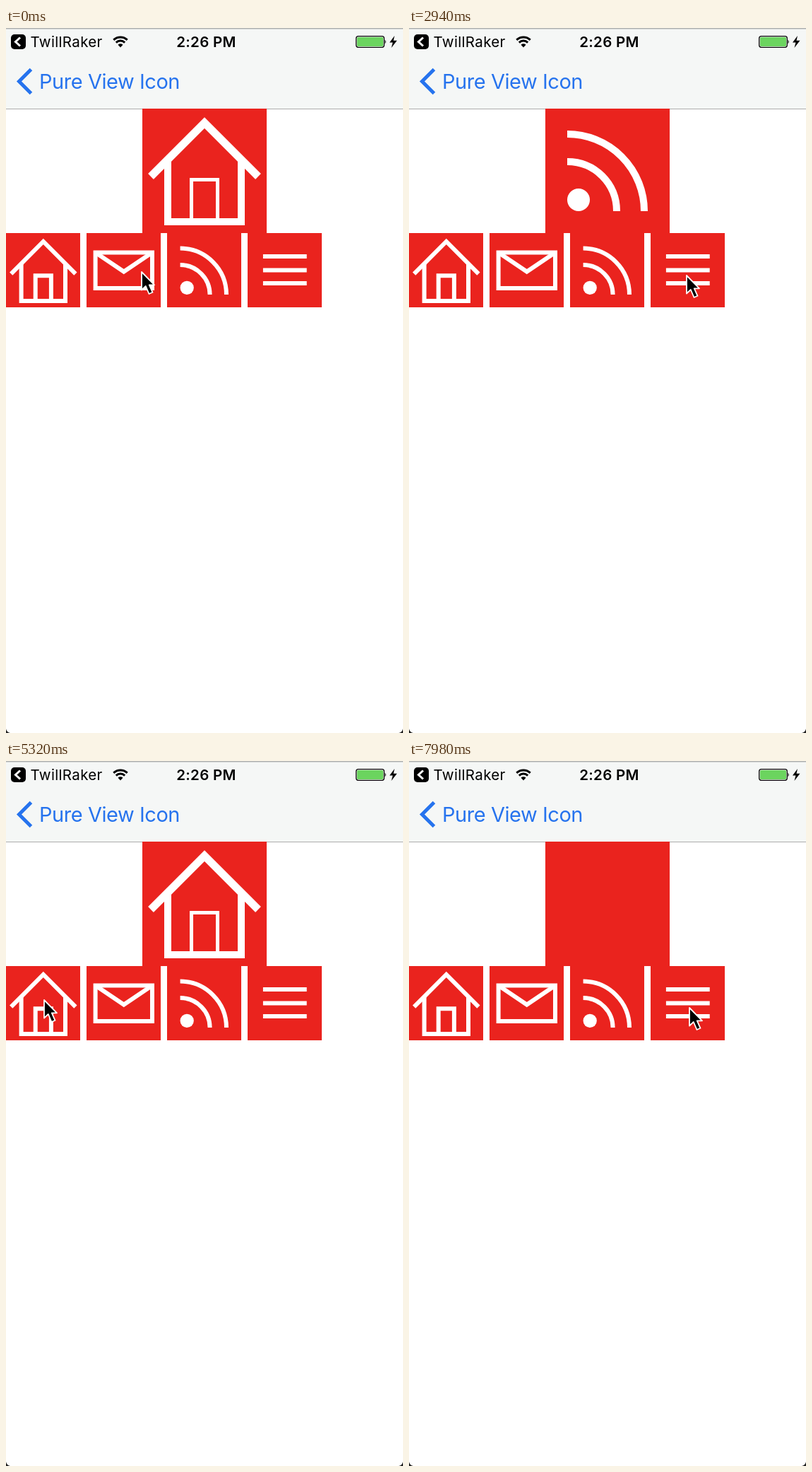
These frames come from a looping animation (562 px wide and 997 px high, 8 s). An HTML page without scripts:

```html
<!DOCTYPE html>
<html lang="en">
<head>
<meta charset="utf-8">
<title>Morphing icon</title>
<style>
html, body { margin: 0; width: 100%; height: 100%; overflow: hidden; background: #fff; }
svg { display: block; width: 100%; height: 100%; }
text { font-family: Inter, "Liberation Sans", sans-serif; }

:root {
  --roof-home: path("M205 210L281 134L357 210");
  --roof-mail: path("M213 161L280 206L347 161");
  --roof-none: path("M281 171.5L281 171.5L281 171.5");
  --roof-menu: path("M229 171.5L281 171.5L333 171.5");
  --roof-turn: path("M228 236L258 206L293 230");
  --body-home: path("M229 186L229 274L333 274L333 186L333 186");
  --body-mail: path("M213 161L213 245L347 245L347 161L208 161");
  --body-none: path("M281 232.5L281 232.5L281 232.5L281 232.5L281 232.5");
  --body-menu: path("M229 232.5L229 232.5L333 232.5L333 232.5L333 232.5");
  --body-turn: path("M207 187L207 300L318 300L318 187L205 187");
  --door-home: path("M262.5 274L262.5 214.5L299.5 214.5L299.5 274");
  --door-mail: path("M281 245L281 245L281 245L281 245");
  --door-none: path("M281 202L281 202L281 202L281 202");
  --door-menu: path("M229 202L229 202L333 202L333 202");
  --arc: path("M154 259C154 220 185 189 224 189C263 189 294 220 294 259C294 298 263 329 224 329C185 329 154 298 154 259Z");
}

.line { fill: none; stroke: #fff; stroke-width: 10px; }
.roof { d: var(--roof-home); }
.body { d: var(--body-home); }
.door { d: var(--door-home); }
.flap { d: var(--roof-mail); }
.case { d: var(--body-mail); }

.big *, .cut, .cursor { animation: 8s ease-in-out infinite; }
.big .solid { animation-name: solid; }
.big .roof { animation-name: roof; stroke-width: 11px; }
.big .body { animation-name: body; }
.big .door { animation-name: door; }
.big .rings { animation-name: rings; }
.big .outer { animation-name: outer; }
.big .inner { animation-name: inner; stroke-miterlimit: 1.5; }
.big .dot { animation-name: dot; }
.cut { animation-name: cut; }
.cursor { animation-name: cursor; }

@keyframes solid {
  0%, 23.5% { opacity: 1; }
  24.5%, 43.7% { opacity: 0; }
  43.75%, 84.75% { opacity: 1; }
  85.75%, 100% { opacity: 0; }
}
@keyframes roof {
  0%, 1.75% { d: var(--roof-home); }
  8.75%, 21% { d: var(--roof-mail); opacity: 1; }
  21.1%, 43.7% { d: var(--roof-mail); opacity: 0; }
  43.75% { d: var(--roof-none); opacity: 1; }
  50.75%, 59.5% { d: var(--roof-menu); }
  66.5%, 82.25% { d: var(--roof-home); }
  84%, 100% { d: var(--roof-turn); }
}
@keyframes body {
  0%, 1.75% { d: var(--body-home); opacity: 1; stroke-width: 10px; }
  8.75%, 24.5% { d: var(--body-mail); }
  43.75% { d: var(--body-none); }
  50.75%, 59.5% { d: var(--body-menu); }
  66.5%, 82.25% { d: var(--body-home); opacity: 1; stroke-width: 10px; }
  84%, 100% { d: var(--body-turn); opacity: .5; stroke-width: 5px; }
}
@keyframes door {
  0%, 1.75% { d: var(--door-home); stroke-width: 5px; }
  8.75%, 24.5% { d: var(--door-mail); stroke-width: 5px; }
  43.75% { d: var(--door-none); stroke-width: 11px; }
  50.75%, 59.5% { d: var(--door-menu); stroke-width: 11px; }
  66.5%, 82.25% { d: var(--door-home); stroke-width: 5px; }
  84%, 100% { d: var(--door-mail); stroke-width: 5px; }
}
@keyframes rings {
  0%, 20.99% { opacity: 0; }
  21%, 40.5% { opacity: 1; }
  43.5%, 82.24% { opacity: 0; }
  82.25%, 96.5% { opacity: 1; }
  99.5%, 100% { opacity: 0; }
}
@keyframes outer {
  0%, 21% { x: 213px; y: 161px; width: 134px; height: 84px; rx: 0px; ry: 0px; }
  22.75%, 23.5% { x: 220px; y: 161px; width: 120px; height: 84px; rx: 60px; ry: 42px; }
  28%, 43.5% { x: 115px; y: 150px; width: 218px; height: 218px; rx: 109px; ry: 109px; }
  82.25% { x: 229px; y: 186px; width: 104px; height: 88px; rx: 0px; ry: 0px; }
  84%, 84.75% { x: 211px; y: 191px; width: 104px; height: 98px; rx: 52px; ry: 49px; }
  89%, 100% { x: 115px; y: 150px; width: 218px; height: 218px; rx: 109px; ry: 109px; }
}
@keyframes inner {
  0%, 21% { d: path("M213 161C235 176 258 191 280 206C302 191 325 176 347 161C325 176 302 191 280 206C258 191 235 176 213 161Z"); stroke-width: 10px; }
  22.75%, 23.5% { d: path("M216 177C236 165 266 141 279 141C292 141 322 165 346 177C325 187 303 197 282 207C260 197 238 187 216 177Z"); stroke-width: 11px; }
  28%, 43.5% { d: var(--arc); stroke-width: 10px; }
  82.25% { d: path("M205 210C230 185 255 160 281 134C306 160 331 185 357 210C331 185 306 160 281 134C255 160 230 185 205 210Z"); stroke-width: 11px; }
  84%, 84.75% { d: path("M251 181C269 191 287 201 305 211C296 228 286 245 277 262C259 252 241 243 224 233C233 216 242 199 251 181Z"); stroke-width: 20px; }
  89%, 100% { d: var(--arc); stroke-width: 10px; }
}
@keyframes dot {
  0%, 23.5% { r: 0px; }
  28%, 43.5% { r: 16px; }
  82.25%, 84.75% { r: 0px; }
  89%, 100% { r: 16px; }
}
@keyframes cut {
  0%, 21% { x: 193px; height: 176px; }
  22.75%, 23.5% { x: 201px; height: 168px; }
  28%, 43.5% { x: 224px; height: 145px; }
  43.75%, 82.25% { x: 193px; height: 176px; }
  84%, 84.75% { x: 205px; height: 163px; }
  89%, 100% { x: 224px; height: 145px; }
}
@keyframes cursor {
  0%, 14% { transform: translate(192px, 345px); }
  19.25%, 29.75% { transform: translate(276px, 351px); }
  35.5%, 49% { transform: translate(393px, 350px); }
  56.5%, 68.25% { transform: translate(54px, 338px); }
  74.5%, 88% { transform: translate(268px, 350px); }
  93.5%, 100% { transform: translate(397px, 349px); }
}
</style>
</head>
<body>
<svg viewBox="0 0 562 997" preserveAspectRatio="none">
  <defs>
    <clipPath id="cut"><rect class="cut" x="193" y="114" width="176" height="176"/></clipPath>
    <rect id="tile" x="193" y="114" width="175.8" height="175.6" fill="#ea231e" shape-rendering="crispEdges"/>
    <g id="home" class="line">
      <path class="roof"/><path class="body"/><path class="door"/>
    </g>
    <g id="mail" class="line" transform="translate(1 -1)">
      <path class="case"/><path class="flap"/>
    </g>
    <g id="feed" class="line">
      <path d="M224 150A109 109 0 0 1 333 259M224 189A70 70 0 0 1 294 259"/>
      <circle cx="240" cy="243" r="16" fill="#fff" stroke="none"/>
    </g>
    <path id="menu" class="line" d="M229.500 169H332.500M229.500 201.500H332.500M229.500 232.500H332.500"/>
  </defs>

  <!-- status and navigation bars -->
  <rect width="562" height="114" fill="#f5f7f6"/>
  <rect width="562" height="1.500" fill="#aeb0af"/>
  <rect y="114" width="562" height="1" fill="#adadad"/>
  <rect x="7" y="9" width="21" height="21" rx="5"/>
  <path d="M20 13.500L13.500 19.500L20 25.500" fill="none" stroke="#fff" stroke-width="3"/>
  <text x="34.500" y="27" font-size="20.500" letter-spacing=".35">TwillRaker</text>
  <g fill="none" stroke="#000" stroke-width="3">
    <path d="M152.300 16.800A14 14 0 0 1 171.700 16.800M155.800 20.600A9 9 0 0 1 168.200 20.600"/>
    <path d="M162 27.500L158.500 23.800A5 5 0 0 1 165.500 23.800Z" fill="#000" stroke="none"/>
  </g>
  <text x="283.500" y="27" font-size="20.500" font-weight="600" letter-spacing=".3" text-anchor="middle">2:26 PM</text>
  <rect x="495.700" y="11.700" width="39.600" height="15.600" rx="3" fill="#fff" stroke="#000" stroke-width="1.300"/>
  <rect x="497" y="13" width="37" height="13" rx="1.500" fill="#6bd45f"/>
  <path d="M536.500 16.500Q539 19.500 536.500 22.500Z"/>
  <path d="M550 11L543 20.500H547.500L545.500 28L553.500 17.800H548.500Z"/>
  <path d="M35.500 58.500L18.500 75.500L35.500 92.500" fill="none" stroke="#2673ee" stroke-width="5"/>
  <text x="47" y="86" font-size="29" letter-spacing="-.45" fill="#2673ee">Pure View Icon</text>

  <!-- morphing icon -->
  <use href="#tile"/>
  <g clip-path="url(#cut)">
    <g class="big">
      <g class="solid">
        <path class="body line"/><path class="door line"/><path class="roof line"/>
      </g>
      <g class="rings">
        <rect class="outer line"/>
        <path class="inner line"/>
        <circle class="dot" cx="240" cy="243" r="0" fill="#fff"/>
      </g>
    </g>
  </g>

  <!-- buttons -->
  <g transform="translate(-115.800 221.600) scale(.6)"><use href="#tile"/><use href="#home"/></g>
  <g transform="translate(-1.800 221.600) scale(.6)"><use href="#tile"/><use href="#mail"/></g>
  <g transform="translate(112.200 221.600) scale(.6)"><use href="#tile"/><use href="#feed"/></g>
  <g transform="translate(226.200 221.600) scale(.6)"><use href="#tile"/><use href="#menu"/></g>

  <path d="M0 991Q1 996 6 997H0ZM562 991Q561 996 556 997H562Z" fill="#222"/>
  <path class="cursor" d="M0 0V25.500L5.800 20L10.500 31L15.500 28.800L10.800 18.300H18Z" stroke="#fff" stroke-width="1.800" stroke-linejoin="round"/>
</svg>
</body>
</html>
```
